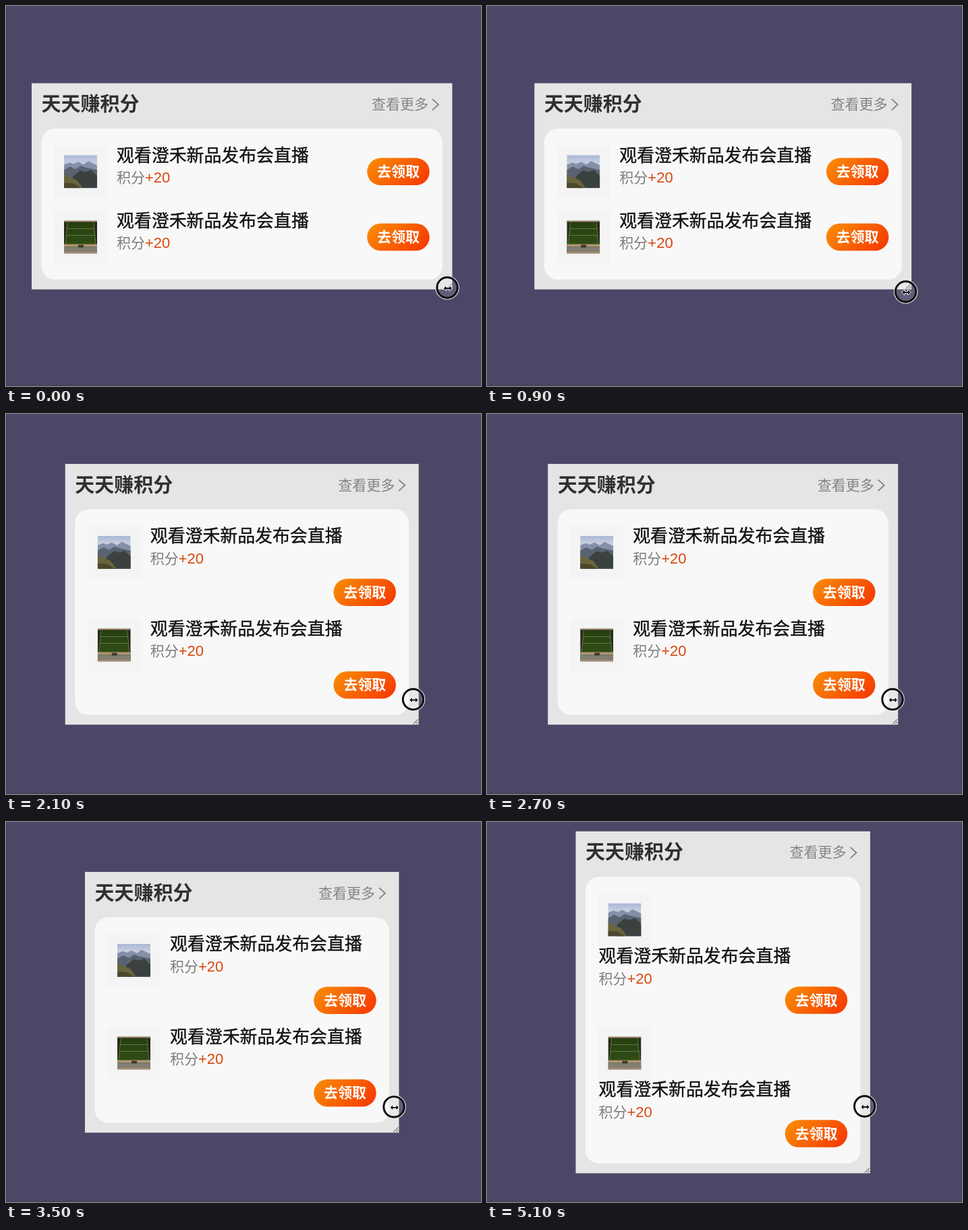
Write an HTML page that moves like this. It is 704x564 px and loops after 5200 ms.

```html
<!DOCTYPE html>
<html lang="zh-CN">
<head>
<meta charset="utf-8">
<title>积分卡片</title>
<style>
  html, body { margin: 0; width: 100%; height: 100%; overflow: hidden; background: #4b4867; }
  svg { display: block; width: 704px; height: 564px; }
  text { font-family: "Noto Sans CJK SC", "Noto Sans CJK", "Noto Sans", sans-serif; }
  .heading { font-size: 29px; font-weight: 600; fill: #303030; }
  .more { font-size: 21px; fill: #848484; }
  .name { font-size: 25.9px; fill: #111; stroke: #111; stroke-width: 0.35; }
  .sub { font-size: 21px; fill: #7c7c7c; }
  .points { font: 22px "Liberation Sans", Arial, sans-serif; fill: #d8480f; }
  .label { font-size: 21px; font-weight: 700; fill: #fff; text-anchor: middle; }
</style>
</head>
<body>
<svg viewBox="0 0 704 564">
  <defs>
    <linearGradient id="orange" x1="0" y1="0.2" x2="1" y2="0.6">
      <stop offset="0" stop-color="#f98a05"/>
      <stop offset="1" stop-color="#f63f02"/>
    </linearGradient>
    <linearGradient id="sky" x1="0" y1="0" x2="0" y2="1">
      <stop offset="0" stop-color="#a9b8d8"/>
      <stop offset="0.3" stop-color="#cfd4df"/>
    </linearGradient>
    <linearGradient id="grass" x1="0" y1="0" x2="0" y2="1">
      <stop offset="0" stop-color="#263f10"/>
      <stop offset="1" stop-color="#304d15"/>
    </linearGradient>
    <clipPath id="frame"><rect width="49" height="49"/></clipPath>
    <g id="hills" clip-path="url(#frame)">
      <rect width="49" height="49" fill="url(#sky)"/>
      <path d="M0 14 8 11 14 13 21 10 29 14 36 9 49 15V49H0Z" fill="#8490a8"/>
      <path d="M0 22 9 17 17 21 25 16 34 19 49 22V49H0Z" fill="#596270"/>
      <path d="M13 32 24 23 32 25 40 22 49 31V49H13Z" fill="#3a413f"/>
      <path d="M0 29 9 33 19 37 28 49H0Z" fill="#69643c"/>
      <path d="M0 41 14 42 25 49H0Z" fill="#4b472b"/>
    </g>
    <g id="field" clip-path="url(#frame)">
      <rect width="49" height="49" fill="#26291a"/>
      <rect width="49" height="2" fill="#a58e68"/>
      <path d="M5 3H44L47 36H2Z" fill="url(#grass)"/>
      <path d="M5 3 2 36M44 3 47 36M4 12H45M3 22H46" fill="none" stroke="#71844f" stroke-width="0.8"/>
      <rect y="35" width="49" height="4" fill="#b09571"/>
      <rect y="39" width="49" height="8" fill="#827e72"/>
      <rect y="46.5" width="49" height="2.5" fill="#a88f70"/>
      <rect x="21" y="36" width="8" height="4" rx="1" fill="#39382b"/>
    </g>
  </defs>
  <rect width="704" height="564" fill="#4b4867"/>
  <rect y="562.5" width="704" height="1.5" fill="#443d55"/>
  <g id="panel">
    <rect id="back" fill="#e5e5e5"/>
    <rect id="card" x="14.5" y="67.5" rx="20" fill="#f8f8f8"/>
    <text class="heading" x="14.5" y="41.5">天天赚积分</text>
    <g id="link">
      <text class="more" x="-119.5" y="38.5">查看更多</text>
      <path d="M-29.5 23.5 -20.5 31.7 -29.5 40" fill="none" stroke="#848484" stroke-width="1.9"/>
    </g>
    <g id="rows"></g>
    <path id="grip" d="M-8-1 -1-8M-4-1 -1-4" stroke="#6c6c6c" stroke-width="1.1" fill="none"/>
  </g>
  <g id="cursor">
    <circle r="17.2" fill="#fff" fill-opacity="0.12" stroke="#e8e8ec" stroke-width="1.2"/>
    <circle r="15.2" fill="none" stroke="#0c0c0e" stroke-width="2.9"/>
    <path d="M-5.3 1 -1.8-2.5V0.1H3.4V-2.5L6.9 1 3.4 4.5V1.9H-1.8V4.5Z"
      fill="#0c0c0e" stroke="#fff" stroke-width="1.5" paint-order="stroke" stroke-linejoin="round"/>
  </g>
</svg>
<script>
const LOOP = 5200, STEP = 100, SPAN = 699.4, MIDDLE = 267.6;

// time, left edge of the panel, cursor x, cursor y
const path = [
  [0, 38, 654, 418],
  [300, 54, 638, 421],
  [600, 69.7, 620.8, 424],
  [900, 70.3, 620.6, 424],
  [1200, 79, 613, 424],
  [1600, 82, 609.5, 423.5],
  [1800, 85.5, 606, 423.5],
  [2400, 90, 601, 423.5],
  [2700, 90.2, 601, 423.5],
  [3000, 102, 589, 423.5],
  [3500, 117, 575, 422.8],
  [4200, 118, 573, 422.8],
  [4300, 121.5, 568, 422.8],
  [4800, 131.5, 559.7, 422],
  [5200, 131.5, 559.7, 422]
];

// each arrangement holds until the left edge passes its limit
const layouts = [
  { limit: 80.5, height: 306, pitch: 97.2, textX: 126, textY: 107, button: 111 },
  { limit: 126, height: 387, pitch: 137.6, textX: 126, textY: 107, button: 170.3 },
  { limit: Infinity, height: 507.5, pitch: 198, textX: 34, textY: 185, button: 230.5 }
];

const $ = id => document.getElementById(id);
const move = (el, x, y) => el.setAttribute('transform', `translate(${x} ${y})`);
const size = (el, w, h) => {
  el.setAttribute('width', w);
  el.setAttribute('height', h);
};

$('rows').innerHTML = ['hills', 'field'].map(photo => `
  <g class="row">
    <rect x="33.5" y="92" width="78.5" height="78.5" fill="#f4f4f5"/>
    <use href="#${photo}" x="48" y="106.7"/>
    <g class="info">
      <text class="name" y="9">观看澄禾新品发布会直播</text>
      <text class="sub" y="40.7">积分<tspan class="points">+20</tspan></text>
    </g>
    <g class="button">
      <rect width="92.5" height="40.5" rx="20.25" fill="url(#orange)"/>
      <text class="label" x="46.2" y="27.4">去领取</text>
    </g>
  </g>`).join('');

const rows = [...document.querySelectorAll('.row')].map(el => ({
  el,
  info: el.querySelector('.info'),
  button: el.querySelector('.button')
}));

function sample(t) {
  const i = path.findIndex(p => p[0] > t);
  const a = path[i - 1], b = path[i];
  const k = (t - a[0]) / (b[0] - a[0]);
  return a.slice(1).map((v, n) => v + (b[n + 1] - v) * k);
}

function draw(t) {
  const [left, x, y] = sample(t);
  const width = SPAN - 2 * left;
  const mode = layouts.find(l => left < l.limit);
  move($('panel'), left, MIDDLE - mode.height / 2);
  size($('back'), width, mode.height);
  size($('card'), width - 29, mode.height - 82);
  move($('link'), width, 0);
  move($('grip'), width, mode.height);
  rows.forEach((row, i) => {
    move(row.el, 0, i * mode.pitch);
    move(row.info, mode.textX, mode.textY);
    move(row.button, width - 126.2, mode.button);
  });
  move($('cursor'), x, y);
}

const start = performance.now();
function tick() {
  const t = (performance.now() - start) % LOOP;
  draw(Math.floor(t / STEP) * STEP);
  requestAnimationFrame(tick);
}
tick();
</script>
</body>
</html>
```
